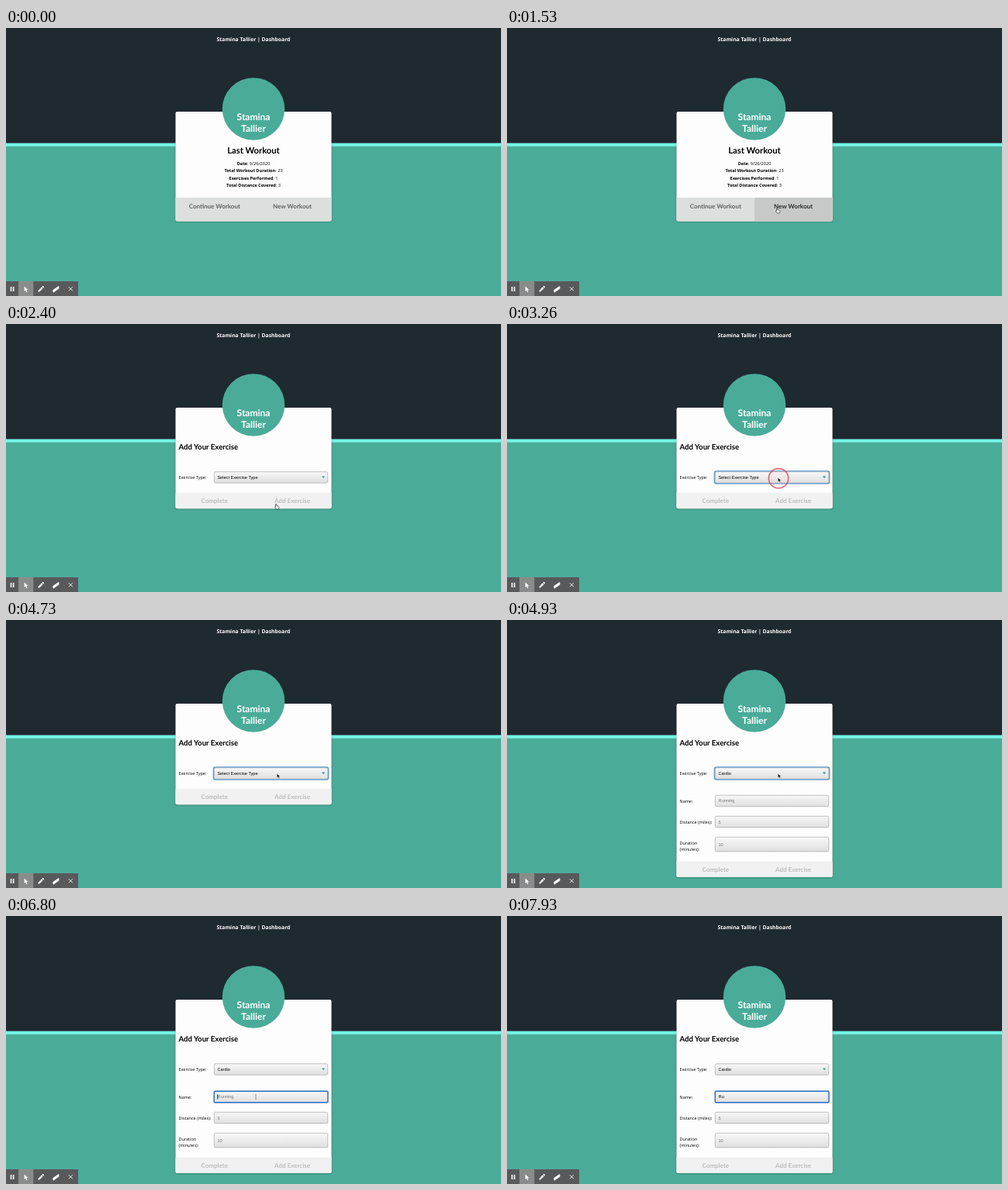
Animation of 638x346 px, one loop 8000 ms. Source, as an HTML page:

```html
<!DOCTYPE html>
<html lang="en">
<head>
<meta charset="utf-8">
<title>Workout dashboard</title>
<style>
  html, body { margin: 0; width: 100%; height: 100%; overflow: hidden; background: #4bab99; }
  svg { display: block; width: 100%; height: 100%; }
  text { font: 5.5px "Open Sans", "Noto Sans", sans-serif; text-rendering: geometricPrecision; white-space: pre; }
  .mid { text-anchor: middle; }
  .bold { font-weight: 700; }
  .lato { font-family: Lato, sans-serif; font-weight: 700; }
  .btn { font-size: 8px; fill: #616363; }
  .off { fill: #bdbebe; }
  .stat { font-size: 5.6px; }
  .field { font: 5.6px "Liberation Sans", Arial, sans-serif; }
  .hint { fill: #757575; }
  .box { fill: url(#shade); stroke: #a9a9a9; stroke-width: .7; }
</style>
</head>
<body>
<svg viewBox="0 0 638 346">
  <defs>
    <linearGradient id="shade" x2="0" y2="1">
      <stop stop-color="#f8f8f8"/><stop offset="1" stop-color="#dfdfdf"/>
    </linearGradient>
    <filter id="soft" x="-10%" y="-10%" width="120%" height="120%"><feGaussianBlur stdDeviation="1"/></filter>
  </defs>

  <rect width="638" height="346" fill="#4bab99"/>
  <rect width="638" height="149" fill="#1f2930"/>
  <rect y="148.6" width="638" height="4.2" fill="#74f5e4"/>
  <text class="mid bold" x="319" y="17" fill="#fff" style="font-size:6.8px">Stamina Tallier | Dashboard</text>

  <rect id="shadow" x="218.3" y="108.6" width="201.4" rx="2" opacity=".3" filter="url(#soft)"/>
  <rect id="card" x="218.5" y="108" width="201" rx="2" fill="#fdfdfd"/>
  <path id="bar"/>

  <g id="home">
    <path id="hover" d="M319 219H419.5V247.5a2 2 0 0 1-2 2H319Z" fill="#c7c9c8"/>
    <text class="mid lato" x="319" y="162" style="font-size:11.2px">Last Workout</text>
    <g class="mid">
      <text class="stat" x="319" y="176.5"><tspan class="bold">Date</tspan>: 9/26/2020</text>
      <text class="stat" x="319" y="186.2"><tspan class="bold">Total Workout Duration</tspan>: 23</text>
      <text class="stat" x="319" y="195.8"><tspan class="bold">Exercises Performed</tspan>: 1</text>
      <text class="stat" x="319" y="205.4"><tspan class="bold">Total Distance Covered</tspan>: 3</text>
    </g>
    <text class="mid lato btn" x="268.8" y="232.6">Continue Workout</text>
    <text id="fresh" class="mid lato btn" x="369" y="232.6">New Workout</text>
  </g>

  <g id="form">
    <text class="lato" x="222.5" y="162" style="font-size:9.65px">Add Your Exercise</text>
    <text x="222.5" y="200.2">Exercise Type:</text>
    <rect id="glow" x="267.6" y="190.1" width="147.8" height="15.8" rx="2.5" fill="none" stroke="#5c9fd6" stroke-width="1.9"/>
    <rect class="box" x="268.3" y="190.8" width="146.4" height="14.4" rx="2"/>
    <text id="type" class="field" x="272.4" y="200"></text>
    <path id="drop" d="M406.8 196.6h4.4l-2.2 2.6Z"/>
    <g class="mid">
      <text class="lato btn off" x="268.8" y="0" dy="0">Complete</text>
      <text class="lato btn off" x="369" y="0" dy="0">Add Exercise</text>
    </g>
  </g>

  <g id="cardio">
    <text x="222.5" y="235.5">Name:</text>
    <text x="222.5" y="263">Distance (miles):</text>
    <text x="222.5" y="290">Duration</text>
    <text x="222.5" y="297.6">(minutes):</text>
    <rect class="box" x="268.3" y="226.3" width="146.4" height="14.4" rx="1.5"/>
    <rect class="box" x="268.3" y="253.3" width="146.4" height="14.4" rx="1.5"/>
    <rect class="box" x="268.3" y="280.3" width="146.4" height="18.6" rx="1.5"/>
    <rect id="focus" x="268.3" y="226.2" width="146.6" height="14.6" rx="1" fill="none" stroke="#286cc4" stroke-width="1.4"/>
    <text id="name" class="field" x="272.6" y="235.4"></text>
    <text class="field hint" x="272.4" y="262.6">5</text>
    <text class="field hint" x="272.4" y="291.8">10</text>
    <rect id="caret" y="230.4" width=".8" height="6"/>
  </g>

  <circle cx="319" cy="104.5" r="40.2" fill="#4aab99"/>
  <g class="mid lato" fill="#fff">
    <text class="lato" x="319" y="119" style="font-size:12px">Stamina</text>
    <text class="lato" x="319" y="134.3" style="font-size:12px">Tallier</text>
  </g>

  <circle id="ring" fill="#f7c6cc" fill-opacity=".15" stroke="#e0405a"/>
  <g id="cursor">
    <path id="arrow" d="M-.8-2.6V3.2L.6 1.9 1.5 4 2.6 3.5 1.7 1.5H3.5Z" fill="#111" stroke="#fff" stroke-width=".5"/>
    <path id="hand" d="M-1.5-3.4q.7-.8 1.2 0v2l2.6.7q.7.3.5 1.4L2.2 3H-.8L-2.5.6q-.2-1 1 -.4Z" fill="#fff" stroke="#222" stroke-width=".65"/>
    <path id="beam" d="M-.9-2.8H.9M0-2.4V2.4M-.9 2.8H.9" fill="none" stroke="#666" stroke-width=".6"/>
  </g>

  <g fill="#fff">
    <rect y="327" width="93" height="19" fill="#57595b"/>
    <rect x="16" y="327" width="19.3" height="19" fill="#8a8b8b"/>
    <path d="M5.7 334h1.6v6H5.7ZM8.8 334h1.6v6H8.8Z"/>
    <path d="M23.6 333.4v6.6l1.6-1.4 1.1 2.6 1.2-.5-1.1-2.5h2.1Z"/>
    <path d="M41.5 340.6v-1.7l4.3-4.3 1.7 1.7-4.3 4.3ZM46.3 334.1l.9-.9q.4-.3.8 0l.9.9q.3.4 0 .8l-.9.9Z"/>
    <path d="M60.3 338.2l7.3-4.9.8.5v2.8l-7.1 4.8-1-.6Z"/>
    <path d="M80.9 334.3l5 5M85.9 334.3l-5 5" stroke="#fff" stroke-width=".9"/>
  </g>
</svg>
<script>
const LOOP = 8000, OPEN = 2000, PICK = 4860, FOCUS = 5660, TYPE_R = 7200, TYPE_U = 7460;
const $ = id => document.getElementById(id);
const show = (id, on) => { $(id).style.display = on ? '' : 'none'; };
const set = (el, attrs) => { for (const k in attrs) el.setAttribute(k, attrs[k]); };
const labels = document.querySelectorAll('.off');

// Pointer moves: start, end, from, to
const moves = [
  [800, 1330, [446, 236], [349, 236]],
  [2450, 3060, [349, 236], [350, 200.8]],
  [5130, 5600, [350, 200.8], [322, 233.4]]
];
const clicks = [1730, 3120, FOCUS];

function pointer(t) {
  let pos = moves[0][2];
  for (const [a, b, from, to] of moves) {
    if (t < a) break;
    const u = Math.min(1, (t - a) / (b - a)), e = u * u * (3 - 2 * u);
    pos = from.map((v, i) => v + (to[i] - v) * e);
  }
  return pos;
}

function drawCard(t) {
  const home = t < OPEN, wide = t >= PICK;
  const top = home ? 219 : wide ? 311.5 : 218;
  const bottom = home ? 249.5 : wide ? 332 : 238.3;
  set($('card'), { height: bottom - 108 });
  set($('shadow'), { height: bottom - 108 });
  set($('bar'), {
    d: `M218.5 ${top}H419.5V${bottom - 2}a2 2 0 0 1-2 2H220.5a2 2 0 0 1-2-2Z`,
    fill: home ? '#dddfde' : '#f0f1f0'
  });
  labels.forEach(el => set(el, { y: top + 13.2 }));
  show('home', home);
  show('form', !home);
  show('cardio', wide);
}

function drawFields(t) {
  const picked = t >= PICK, active = t >= 3120 && t < FOCUS;
  show('glow', active);
  set($('drop'), { fill: active ? '#378fae' : '#43a391' });
  $('type').textContent = picked ? 'Cardio' : 'Select Exercise Type';

  const typed = t >= TYPE_U ? 'Ru' : t >= TYPE_R ? 'R' : '';
  const last = t >= TYPE_U ? TYPE_U : t >= TYPE_R ? TYPE_R : FOCUS;
  const blink = last === FOCUS ? 500 : 470;
  $('name').textContent = typed || 'Running';
  set($('name'), { fill: typed ? '#000' : '#757575' });
  show('focus', t >= FOCUS);
  show('caret', t >= FOCUS && (t - last) % (2 * blink) < blink);
  set($('caret'), { x: [272.4, 276.8, 280][typed.length] });
}

function drawPointer(t) {
  const [x, y] = pointer(t);
  const hand = t < 3120 && y > 218 && x < 419.5;
  const beam = t >= PICK && y > 226;
  show('cursor', t >= 800 && t < TYPE_R);
  set($('cursor'), { transform: `translate(${x} ${y})` });
  show('hand', hand);
  show('beam', beam);
  show('arrow', !hand && !beam);

  const over = t >= 800 && hand;
  show('hover', over);
  $('fresh').style.fill = over ? '#2a2c2c' : '';

  const age = t - (clicks.filter(c => c <= t).pop() ?? -LOOP);
  show('ring', age < 220);
  set($('ring'), {
    cx: x, cy: y - (beam ? 0 : 1.5),
    r: 14 * (1 - Math.exp(-age / 60)),
    'stroke-width': 0.5 + age / 120,
    opacity: Math.max(0, Math.min(1, (220 - age) / 100))
  });
}

function frame(now) {
  const t = now % LOOP;
  drawCard(t);
  drawFields(t);
  drawPointer(t);
  requestAnimationFrame(frame);
}
frame(0);
</script>
</body>
</html>
```
